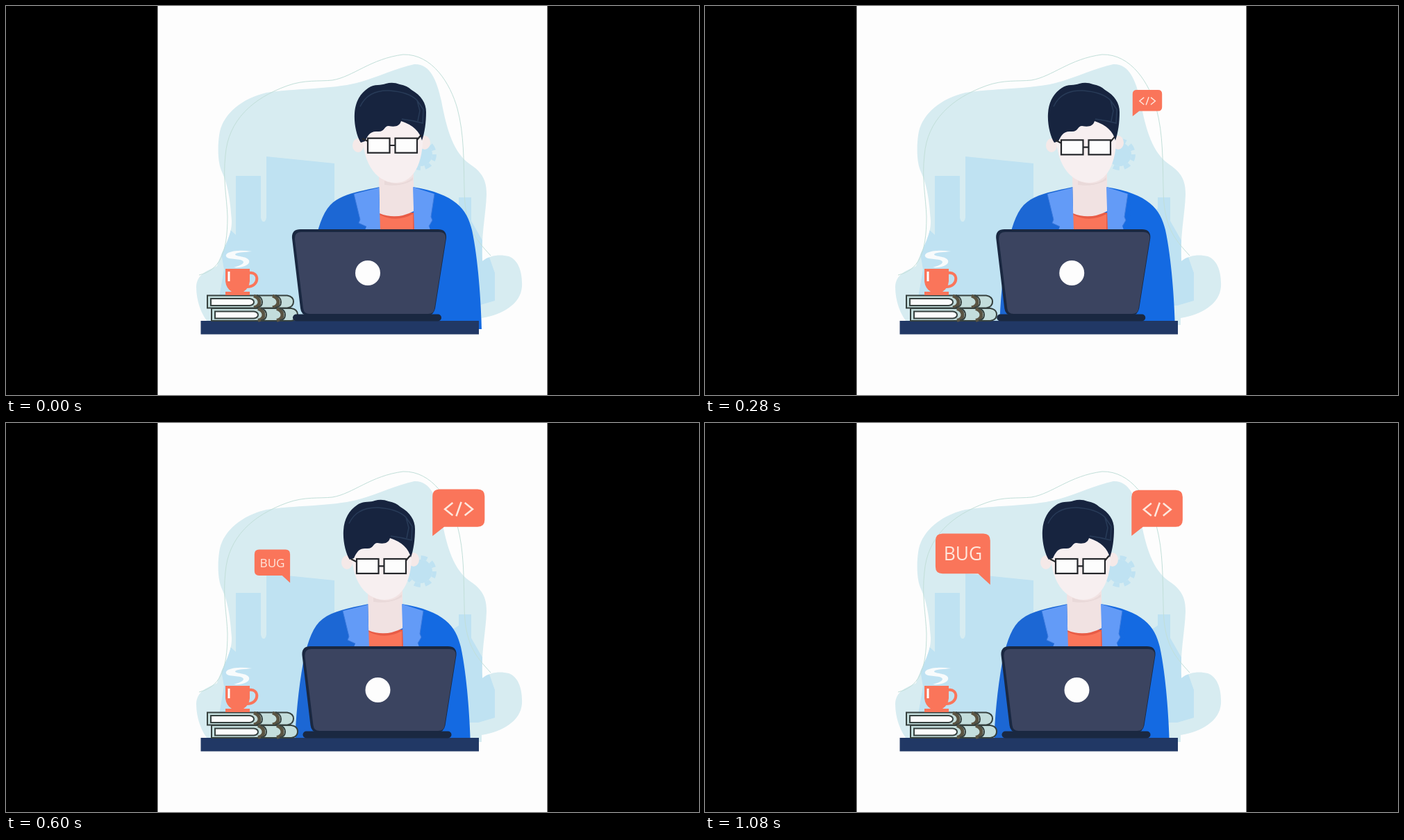
Animation of 998x561 px, one loop 1160 ms. Source, as an HTML page:

```html
<!DOCTYPE html>
<html lang="en">
<head>
<meta charset="utf-8">
<title>Coder at a desk</title>
<style>
html, body { margin: 0; width: 100%; height: 100%; overflow: hidden; background: #000; }
svg { display: block; width: 100vw; height: 100vh; }
.bubble { fill: #fa755a; }
.ink { fill: none; stroke: #fee7dd; stroke-width: 2.5; }
text { font: 26px "Open Sans", "Noto Sans", sans-serif; fill: #fee7dd; text-anchor: middle; }
</style>
</head>
<body>
<svg viewBox="0 0 998 561">
  <defs>
    <linearGradient id="coat">
      <stop offset=".35" stop-color="#1c67d4"/>
      <stop offset=".75" stop-color="#146ae2"/>
    </linearGradient>
    <clipPath id="blob"><use href="#blobShape"/></clipPath>
    <g id="book" stroke="#36413f" stroke-width="2">
      <path fill="#c3dddc" d="M290 417.500H405Q414 419 414 426.500T405 435.500H290Z"/>
      <path fill="#fdfdfd" d="M295 422H351Q357 423 357 427T351 432H295Z"/>
      <path fill="none" stroke="#5a5443" stroke-width="5" d="M357 418Q365 421 365 427T357 435M384 418Q392 421 392 427T384 435"/>
      <path fill="none" d="M361 417Q369 420 369 427T361 435M388 417Q396 420 396 427T388 435"/>
    </g>
  </defs>

  <rect x="218.400" width="561.200" height="561" fill="#fdfdfd"/>

  <!-- Backdrop -->
  <path id="blobShape" fill="#d7ecf1" d="M588 84C610 83 620 105 627 137C635 180 645 212 668 228C686 240 692 251 692 272C691 302 684 330 686 368C697 359 712 358 724 361C738 366 744 384 743 405C741 430 715 445 685 450V460H294C281 446 274 425 274 405C275 386 290 382 304 375C311 352 326 332 325 309C323 285 321 260 310 237C303 218 306 190 308 181C314 155 340 133 375 125C410 119 470 120 505 111C535 103 560 90 588 84Z"/>
  <g clip-path="url(#blob)" fill="#bfe2f2">
    <path d="M308 345L322 322L331 330V245H367V305Q368 311 371 311T375 305V217L473 227V460H300L314 380Z"/>
    <path d="M640 300L652 292V276H670V310L690 345L704 385V425L680 432H640Z"/>
    <circle cx="597" cy="214" r="17"/>
    <circle cx="597" cy="214" r="20" fill="none" stroke="#bfe2f2" stroke-width="6" stroke-dasharray="9 6.7"/>
  </g>
  <path fill="none" stroke="#c2dfd9" d="M278 388C307 381 319 358 319 304C318 275 312 250 316 215C320 165 355 133 405 115C430 106 450 109 470 107C500 102 525 76 572 70C614 69 640 112 650 148C660 185 659 225 660 262C660 317 675 335 698 360"/>

  <!-- Person -->
  <g id="person">
    <path fill="url(#coat)" d="M538 261C505 268 482 272 467 287C455 300 449 322 444 345C437 385 433 425 432 466H685C684 425 680 365 671 323C664 293 647 271 586 261Z"/>
    <path fill="#fa755a" d="M538 298H589V323H538Z"/>
    <path fill="#e85c46" d="M538 298H589V323H586V300Q562 313 538 301Z"/>
    <path fill="#f1e2e2" d="M537 240H587V296Q562 309 538 299Z"/>
    <path fill="#e9d9d9" d="M545 252Q570 262 586 247V251Q570 261 545 258Z"/>
    <path fill="#639bf7" d="M501 271L537 262L539 323H517L519 318L508 313L510 308ZM586 261L617 271L612 304L614 309L609 317L611 323H588Z"/>
    <path fill="none" stroke="#3e7cdf" d="M501 271L510 308L508 313L519 318M617 271L612 304L614 309L609 318"/>
    <ellipse cx="507" cy="201" rx="8" ry="10" fill="#f5e9e8"/>
    <ellipse cx="603" cy="197" rx="8" ry="10" fill="#f5e9e8"/>
    <path fill="#f7eff0" d="M514 175Q560 145 600 175C603 220 590 255 561 255C530 254 511 222 514 175Z"/>
    <path fill="#17243f" d="M511 197C505 188 501 170 502 155C503 138 510 126 522 118C530 112 541 115 547 112Q557 109 567 113Q578 115 584 121C598 129 605 140 605 153C605 168 603 182 599 194Q594 174 569 166C567 173 561 175 551 173C544 173 546 182 535 181C524 180 521 187 517 195Z"/>
    <path fill="none" stroke="#283b58" stroke-width="1.5" d="M510 145Q521 121 552 122Q580 124 592 136L601 149L600 169Q586 165 570 163M592 136L596 151L593 166"/>
    <g id="glasses" fill="#fdfdfd" stroke="#24262a" stroke-width="2.2">
      <path fill="none" d="M521 195L513 191M592 193L598 186M552 201H561"/>
      <rect x="521" y="190.700" width="31.500" height="21"/>
      <rect x="560.500" y="190.700" width="31.500" height="21"/>
    </g>
  </g>

  <!-- Desk -->
  <path fill="#213865" d="M280.500 454H681V473.500H280.500Z"/>
  <use href="#book"/>
  <use href="#book" x="6" y="18.500"/>
  <g fill="#fa755a">
    <path d="M316 379H351V397Q350 407 342 412H351V417H316V412H325Q317 407 316 397Z"/>
    <path fill="none" stroke="#fa755a" stroke-width="4" d="M350 385C365 382 366 405 347 405"/>
    <path fill="none" stroke="#fff" stroke-width="3" d="M321 383V397"/>
    <path fill="#f8fbfc" d="M354 354C335 351 315 354 317 361C319 367 340 363 342 369C342 373 334 375 328 377C342 378 352 373 350 367C347 360 330 362 330 358C332 355 344 355 354 354Z"/>
  </g>

  <g id="laptop">
    <path fill="#1a2841" d="M424 322H622Q635 322 634 335L618 436Q616 446 607 446H435Q425 446 424 436L412 335Q411 322 424 322Z"/>
    <path fill="#3b4460" d="M425 326H624Q634 326 633 336L617 437Q616 444 608 444H437Q429 444 428 436L416 337Q415 326 425 326Z"/>
    <rect x="413" y="444.500" width="214" height="10" rx="5" fill="#1a2841"/>
    <circle cx="521" cy="385" r="18" fill="#fdfdfd"/>
  </g>

  <!-- Speech bubbles, drawn around their growth points -->
  <g id="code">
    <path class="bubble" d="M7-57H60Q70-57 70-47V-14Q70-4 60-4H13L-3.500 9V-47Q-3.500-57 7-57Z"/>
    <path class="ink" d="M25-38L14-29L25-20M37-39L30-19M42-38L53-29L42-20"/>
  </g>
  <g id="bug">
    <path class="bubble" d="M-63-65H-5Q4.700-65 4.700-55V7.700L-12.500-8.200H-63Q-73-8.200-73-18V-55Q-73-65-63-65Z"/>
    <text x="-34" y="-27">BUG</text>
  </g>
</svg>
<script>
const LOOP = 1160, STEP = 40, GROW = 485, SLIDE = 560;
const place = (id, transform) =>
  document.getElementById(id).setAttribute('transform', transform);

// Linear growth followed by a damped overshoot
function pop(ms) {
  if (ms < GROW) return Math.max(0, ms / GROW);
  const s = (ms - GROW) / 1000;
  return 1 + 0.25 * Math.sin(8 * Math.PI * s) * Math.exp(-9 * s);
}

function draw(now) {
  const t = Math.floor(now % LOOP / STEP) * STEP;
  const p = Math.min(1, t / SLIDE);
  place('person', `translate(${-16 * p})`);
  place('glasses', `translate(0 ${5.3 * p})`);
  place('laptop', `translate(${14.5 * p})`);
  place('code', `translate(617.800 153.800) scale(${pop(t)})`);
  place('bug', `translate(406 225.500) scale(${pop(t - 280)})`);
}

const start = performance.now();
function tick() {
  draw(performance.now() - start);
  requestAnimationFrame(tick);
}
tick();
</script>
</body>
</html>
```
